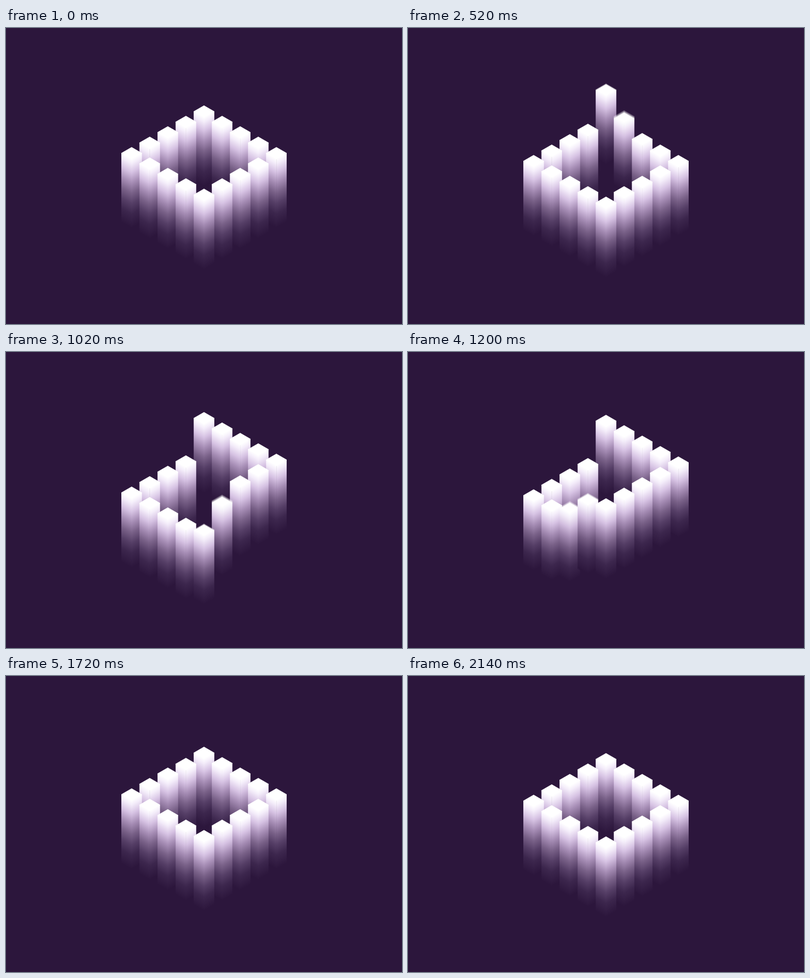
An HTML page with a canvas that plays this animation: 800 by 600 pixels, repeating every 2.16 s.

```html
<!DOCTYPE html>
<html lang="en">
<head>
<meta charset="utf-8">
<title>Rising columns</title>
<style>
html, body { margin: 0; width: 100%; height: 100%; overflow: hidden; background: #2c163c; }
canvas { display: block; width: 800px; height: 600px; }
</style>
</head>
<body>
<canvas id="stage" width="800" height="600"></canvas>
<script>
const LOOP = 2160, STEP = 20;
const RISE = 66.6;                          // lift per loop, equal to the total sinking
const FIRST = 302, DELAY = 77.5, LIFT = 310;
const SHUTTER = 11, SAMPLES = 6;
const TAN = Math.tan(Math.PI / 6);
const DX = 36.55, DY = DX * TAN;            // spacing of columns
const W = 20.8, H = W * TAN;                // half size of a top
const LENGTH = 140;
const BG = '#2c163c';

const stage = document.getElementById('stage').getContext('2d');
const layer = document.createElement('canvas');
layer.width = 800;
layer.height = 600;
const ctx = layer.getContext('2d');

const fade = ctx.createLinearGradient(0, 0, 0, LENGTH);
[
  [0, '#ffffff'], [0.07, '#f4edfa'], [0.2, '#d6c2e3'], [0.35, '#a68db5'],
  [0.5, '#796188'], [0.65, '#553e66'], [0.8, '#3c264d'], [1, BG]
].forEach(([at, color]) => fade.addColorStop(at, color));

// Clockwise ring from the back corner, four steps per side.
const ring = [];
let x = 400, y = 156.9;
for (let i = 0; i < 16; i++) {
  ring.push({ x, y, start: FIRST + i * DELAY });
  x += i < 4 || i >= 12 ? DX : -DX;
  y += i < 8 ? DY : -DY;
}
const order = [...ring].sort((a, b) => a.y - b.y);

function ease(u) {
  u = Math.min(1, Math.max(0, u));
  return u < 0.5 ? 4 * u ** 3 : 1 - 4 * (1 - u) ** 3;
}

function drawFace(x, y, side) {
  ctx.setTransform(1, -side * TAN, 0, 1, x, y);
  ctx.fillStyle = fade;
  ctx.fillRect(side < 0 ? -W : 0, 0, side < 0 ? W + 0.4 : W, LENGTH);
}

function drawColumn(x, y) {
  ctx.setTransform(1, 0, 0, 1, x, y);
  ctx.fillStyle = '#fff';
  ctx.beginPath();
  ctx.moveTo(0, 0);
  ctx.lineTo(W, H);
  ctx.lineTo(W, H + 1);
  ctx.lineTo(0, 2 * H + 1);
  ctx.lineTo(-W, H + 1);
  ctx.lineTo(-W, H);
  ctx.fill();
  drawFace(x, y + 2 * H, -1);
  drawFace(x, y + 2 * H, 1);
}

function drawScene(t) {
  ctx.setTransform(1, 0, 0, 1, 0, 0);
  ctx.fillStyle = BG;
  ctx.fillRect(0, 0, 800, 600);
  const sink = RISE * t / LOOP;
  for (const c of order) {
    drawColumn(c.x, c.y + sink - RISE * ease((t - c.start) / LIFT));
  }
}

// Average several moments for motion blur.
function render(t) {
  for (let i = 0; i < SAMPLES; i++) {
    drawScene(t + SHUTTER * (i / (SAMPLES - 1) - 0.5));
    stage.globalAlpha = 1 / (i + 1);
    stage.drawImage(layer, 0, 0);
  }
}

const begin = performance.now();
let shown = -1;
function tick() {
  const t = Math.floor((performance.now() - begin) % LOOP / STEP) * STEP;
  if (t !== shown) render(shown = t);
  requestAnimationFrame(tick);
}
tick();
</script>
</body>
</html>
```
